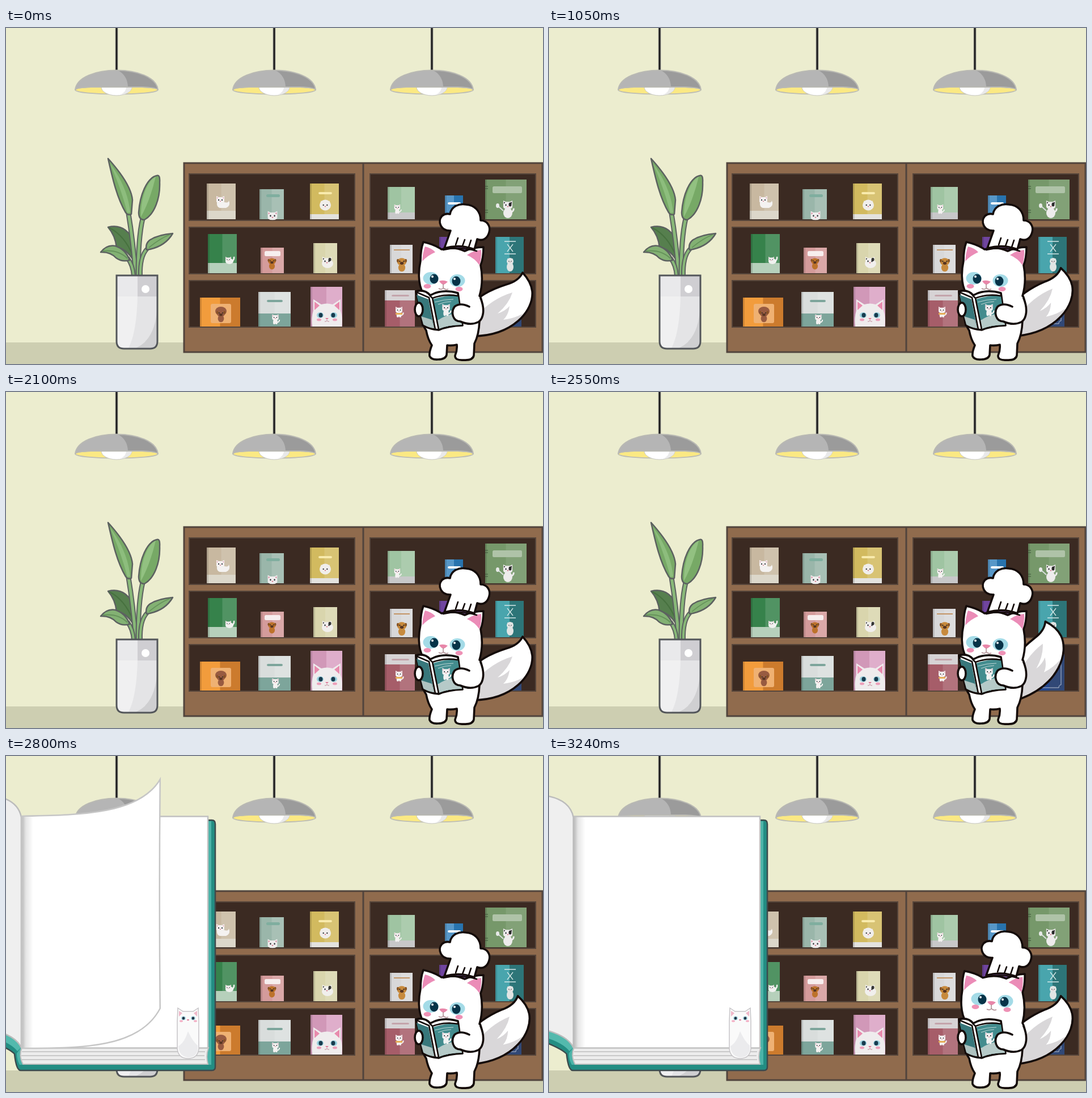
Recreate the animation shown at these times as an HTML page. Size 947 by 592 pixels, loop 3390 ms.

```html
<!DOCTYPE html>
<html lang="en">
<head>
<meta charset="utf-8">
<title>Reading cat</title>
<style>
html, body { margin: 0; width: 100%; height: 100%; overflow: hidden; background: #ecedcf; }
svg { display: block; width: 100%; height: 100%; }
.ink { stroke: #140b09; stroke-width: 3.6; stroke-linejoin: round; stroke-linecap: round; fill: #fff; }
.leaf { stroke: #5c6160; stroke-width: 2.5; stroke-linejoin: round; }
</style>
</head>
<body>
<svg id="stage" viewBox="0 0 947 592"></svg>
<script>
const rect = (x, y, w, h, fill, more = '') =>
  `<rect x="${x}" y="${y}" width="${w}" height="${h}" fill="${fill}" ${more}/>`;
const oval = (x, y, rx, ry, fill, more = '') =>
  `<ellipse cx="${x}" cy="${y}" rx="${rx}" ry="${ry}" fill="${fill}" ${more}/>`;
const path = (d, fill = 'none', more = '') => `<path d="${d}" fill="${fill}" ${more}/>`;
const ink = (d, more = '') => `<path class="ink" d="${d}" ${more}/>`;
const stroke = (color, width) => `stroke="${color}" stroke-width="${width}"`;
const group = (id, content) => `<g id="${id}">${content}</g>`;
const at = (x, y, content, scale = 1) => `<g transform="translate(${x} ${y}) scale(${scale})">${content}</g>`;

const lampRim = 'Q72 105 45 104H-45Q-72 105-73 109Z';
const lamp = x => at(x, 0,
  rect(-2, -3, 4, 78, '#1c1c1c', stroke('#a9a9a2', 1)) +
  path('M-73 109C-70 119 70 119 73 109' + lampRim, '#fbe983', stroke('#bdbdb4', 2)) +
  path('M-27 104A27 15 0 0 0 27 104Z', '#fff', stroke('#c8c8c4', 1)) +
  path('M17 104Q17 113 6 118A27 15 0 0 0 27 104Z', '#e9e9e9') +
  path('M-73 109C-68 63 68 63 73 109' + lampRim, '#b5b5b5') +
  path('M0 74C14 79 20 92 20 104H45Q72 105 73 109C68 86 34 74 0 74', '#9b9b9b') +
  path('M-73 109C-68 63 68 63 73 109' + lampRim, 'none', stroke('#b9b9b3', 2)));

function plant() {
  const stem = (d, w) => path(d, 'none', stroke('#5c6160', w + 4)) + path(d, 'none', stroke('#88b878', w));
  const leaf = (d, fill = '#77a966') => path(d, fill, 'class="leaf"');
  const vase = 'M195 436H267V552Q267 565 254 565H208Q195 565 195 552Z';
  return leaf('M180 351C204 345 222 360 225 382V410Q212 388 195 387Q193 366 180 351Z', '#567f4e') +
    path('M182 352Q209 365 224 402', 'none', stroke('#47713f', 2)) +
    stem('M216 327Q224 375 229 437', 5) + stem('M241 336Q233 370 233 437', 5) +
    stem('M214 405Q224 418 225 437', 4) + stem('M249 389Q236 402 237 437', 4) +
    leaf('M180 230C198 250 221 280 223 303L221 328Q215 331 211 325C196 300 188 266 180 230Z') +
    path('M183 238C201 262 216 292 219 325L214 326C205 290 193 261 183 238', '#8dbd7d') +
    leaf('M266 260Q272 258 271 272C272 300 262 328 244 338Q234 338 234 325C236 295 248 264 266 260Z') +
    path('M264 262C250 268 237 298 238 333Q254 304 264 262', '#92c181') +
    leaf('M167 395Q178 381 193 384Q211 390 218 409Q205 413 194 405Q184 394 167 395Z', '#83b173') +
    path('M171 393Q198 390 214 406', 'none', stroke('#65925a', 2)) +
    leaf('M294 362Q280 386 248 391Q245 381 253 374Q268 364 294 362Z', '#83b173') +
    path('M289 364Q271 371 252 387', 'none', stroke('#65925a', 1.5)) +
    path(vase, '#e4e4e6') +
    path('M196 437H232Q234 530 216 564H208Q196 564 196 552Z', '#f0f0f1') +
    rect(232, 437, 34, 36, '#cfced2') + rect(196, 437, 36, 36, '#e9e9eb') +
    path('M266 500Q261 550 229 564H254Q266 564 266 552Z', '#cfcfd1') +
    oval(246, 460, 7, 7, '#fff') +
    path(vase, 'none', stroke('#53565a', 3));
}

// Small pet, head centred on the origin, about 16 px wide.
const pet = (x, y, scale = 1, coat = '#f4f2f1', inner = '#e79ab2', body = true) => at(x, y,
  (body ? path('M-4 4Q-6 12-4 15H-1L0 13 1 15H4Q6 10 4 4Z', coat) + path('M4 11Q9 10 9 5', 'none', stroke(coat, 2.5)) : '') +
  path('M-7 1L-7-7-3-5H3L7-7V1Q8 6 0 6Q-8 6-7 1Z', coat) +
  path('M-6-5V-2L-4-4ZM6-5V-2L4-4Z', inner) +
  oval(-3, 0, 1, 1.2, '#292b32') + oval(3, 0, 1, 1.2, '#292b32') +
  oval(0, 2.2, 1.1, .8, '#d26b80'), scale);

const dog = (x, y, scale = 1, coat = '#c78a3d') => at(x, y,
  oval(0, 10, 6, 7, coat) + oval(0, 0, 8, 6.5, coat) +
  oval(-7, -2, 1.8, 3, '#875222') + oval(7, -2, 1.8, 3, '#875222') +
  oval(0, 2.5, 3.2, 2.4, '#573522') + oval(-3.5, -1, 1, 1.2, '#222') + oval(3.5, -1, 1, 1.2, '#222'), scale);

function book(x, y, w, h, color, { right = '#ffffff22', band, bandH = 0, bar, top = '' } = {}) {
  return rect(x, y, w, h, color) + rect(x + w / 2, y, w / 2, h, right) + top +
    (band ? rect(x, y + h - bandH, w, bandH, band) : '') +
    rect(x, y, 3, h, '#0002') +
    (bar ? rect(...bar, 'rx="2.5"') : '');
}

const bigFace = at(566, 502,
  path('M-26 24Q-28 8-24-4V-24L-10-15Q0-18 10-15L24-24V-4Q28 8 26 24Z', '#efeced') +
  path('M-22-20V-5L-13-13ZM22-20V-5L13-13Z', '#e88bad') +
  [-1, 1].map(s => oval(12 * s, 4, 6, 5, '#9bd2df') + oval(11 * s, 4, 3.5, 4, '#183b4e') +
    oval(14 * s, 12, 4, 2.3, '#eda0ba')).join('') +
  path('M-3 9H3L0 12Z', '#df7998') + path('M-4 15Q-1 16 0 13Q1 16 4 15', 'none', stroke('#bd8796', 1)));

function shelf() {
  const cells = [323, 642].flatMap(x => [257, 351, 445].map(y =>
    rect(x, y, 292, 82, '#3b2a22', stroke('#57463b', 2)))).join('');
  return rect(314, 238, 632, 333, '#906b4d', stroke('#51443d', 3)) +
    path('M630 238V571', 'none', stroke('#51443d', 3)) + cells +
    book(354, 274, 51, 63, '#c8b8a0', { band: '#dcd7ca', bandH: 15 }) + pet(378, 303, 1, '#f4f2f1', '#e79ab2', false) +
    path('M372 307H386Q392 309 393 304Q397 313 388 317H377Q371 315 372 307Z', '#f4f2f1') +
    book(447, 284, 43, 53, '#9ab6aa', { bar: [459, 293, 24, 5, '#7fae9f'] }) + pet(470, 331, 1.2, '#efeded', '#d87894', false) +
    book(536, 274, 51, 63, '#d2ba5f', { band: '#e3e2df', bandH: 9, bar: [551, 289, 24, 4, '#f8eaac'] }) +
    oval(563, 312, 10, 9.5, '#f0eeeb') + pet(563, 312, 1.1, '#f0eeeb', '#f0eeeb', false) +
    book(673, 280, 48, 57, '#9fc4a2', { band: '#c8c8c9', bandH: 12 }) + pet(690, 316, .75) +
    book(774, 295, 32, 42, '#5797c8', { right: '#2873ae', bar: [779, 307, 23, 4, '#fff'] }) +
    book(845, 267, 73, 70, '#76986a', { right: '#ffffff16', bar: [858, 279, 52, 12, '#afc3a8'] }) +
    path('M845 279H850M845 283H850M845 321H850M845 325H850', 'none', stroke('#3d5338', 1)) +
    oval(885, 326, 8, 9, '#eeecec') + pet(885, 312, 1.15, '#eeecec', '#292929') + oval(889, 311, 2.5, 3.5, '#292929') +
    path('M867 313L877 322', 'none', stroke('#d9dedd', 2)) + oval(867, 313, 3, 4, '#e6e9e7') +
    book(356, 363, 51, 69, '#36824b', { band: '#b6d0bb', bandH: 18 }) +
    oval(394, 411, 7, 5, '#f0f1ef') + pet(392, 408, .7, '#f0f1ef', '#e79ab2', false) +
    path('M398 412Q403 408 402 403', 'none', stroke('#f0f1ef', 2.5)) +
    book(449, 387, 41, 45, '#d49b9b', { bar: [456, 393, 28, 9, '#f7eeee'] }) + dog(469, 411, .85, '#bd722b') +
    book(542, 379, 42, 53, '#d9d5ad') + oval(567, 415, 10, 8, '#f1efed') +
    pet(566, 411, 1.15, '#f1efed', '#333', false) + oval(571, 408, 2.5, 3, '#333') +
    book(677, 382, 40, 50, '#d8d8d9') + rect(684, 390, 28, 2, '#c39465') + dog(698, 412, 1.02) +
    book(764, 368, 48, 64, '#70459f') +
    book(863, 368, 50, 64, '#49a5ad', { right: '#2d7578' }) +
    path('M879 376H899M879 398H899M884 381L894 394M894 381L884 394', 'none', stroke('#d5e8e7', 1.3)) +
    oval(889, 411, 6, 6, '#e1e5e4') + oval(889, 421, 6, 8, '#e1e5e4') + pet(889, 411, .7, '#e1e5e4', '#e1e5e4', false) +
    book(342, 475, 71, 51, '#f29c3c', { right: '#cc7b2d' }) + rect(361, 486, 36, 34, '#efb173', 'rx="3"') +
    oval(379, 499, 10, 8, '#985b41') + dog(379, 503, .9, '#985b41') +
    book(445, 465, 57, 61, '#d9dddc', { band: '#7da59b', bandH: 23, bar: [460, 479, 28, 4, '#7da59b'] }) + pet(475, 510, .8) +
    book(537, 456, 56, 70, '#d198b8', { right: '#dfaecb' }) + bigFace +
    book(668, 462, 53, 64, '#a65d69', { top: rect(668, 462, 53, 18, '#d7d3d5'), bar: [680, 470, 31, 3, '#c4a4ab'] }) +
    pet(693, 497, .85) + rect(687, 502, 12, 3, '#e5ad58') +
    book(856, 462, 53, 64, '#25478d', { right: '#314876' }) +
    path('M862 472Q866 472 866 468H899Q899 472 903 472V516Q899 516 899 521H866Q866 516 862 516Z', 'none', stroke('#b5bed0', 1));
}

const tailOutline = 'M818 490Q838 466 882 452Q904 446 911 431Q926 447 928 464C931 498 894 542 824 543Z';
const tail = path(tailOutline, '#fff') +
  path('M820 518Q852 478 893 466Q887 486 867 503Q880 499 888 490Q886 506 877 514Q896 512 912 503C894 530 862 543 824 543Z', '#d9d7d9') +
  ink(tailOutline, 'style="fill:none"');

const face = [[749, 441, 755, 743, 455], [796, 445, 794, 799, 460]].map(([x, y, pupil, cheekX, cheekY]) =>
  oval(x, y, 13.5, 11, '#a4dbe7') + oval(pupil, y + 1, 7.5, 8.5, '#073348') +
  oval(pupil - 3, y - 3, 2, 2, '#fff') + oval(cheekX, cheekY, 6.5, 4, '#ee91b5')).join('') +
  path('M764 446Q771 443 779 447Q774 452 771 452Q767 451 764 446', '#e886a9') +
  path('M771 451V458M763 459Q769 462 771 458Q775 462 780 460', 'none', stroke('#a9868c', 1.5));

const head = ink('M736 468C725 450 728 424 731 410Q731 390 736 377Q755 381 768 390Q790 384 809 393Q825 386 842 386Q842 406 837 418C841 438 840 455 835 472') +
  path('M739 385Q751 388 757 395Q743 401 734 411Q735 395 739 385ZM838 391Q824 392 813 400Q827 406 835 418Q839 405 838 391', '#eb8cb7');

const hat = ink('M773 388L784 357C767 358 760 341 769 331Q775 326 783 328C785 314 799 309 811 311C827 312 837 323 837 339C849 339 855 350 852 360C849 371 841 376 831 372L826 390Q800 380 773 388Z') +
  ink('M797 370L793 382M809 373L805 384M820 374L816 386M771 391Q800 384 830 393', 'style="fill:none;stroke-width:2.6"');

const body = ink('M736 468C728 493 732 520 741 533Q744 549 751 559Q746 571 747 578Q750 585 762 584Q775 584 777 576L778 559Q787 560 795 558Q796 568 792 577Q791 586 807 585Q823 586 825 577L826 556Q834 541 835 516C842 501 840 480 835 470');

const smallBook =
  ink('M723 464Q739 460 748 471Q769 459 797 467L805 524Q780 525 763 532L755 531Q744 529 735 524Z') +
  path('M724 470L745 478 755 529Q744 527 736 522Z', '#38777b') +
  path('M732 508L751 514 755 529Q744 527 736 522Z', '#afc2c0') +
  path('M753 478Q775 470 797 472L804 523Q780 523 763 530Z', '#438c8e') +
  path('M760 516Q780 502 801 503L804 523Q780 523 763 530Z', '#b6cac8') +
  ink('M723 465L746 475 757 531M748 472L752 476 763 531M752 476Q773 468 797 472', 'style="fill:none;stroke-width:2.6"') +
  path('M756 483Q772 478 789 478M762 487Q774 482 785 482', 'none', stroke('#bed6d5', 1)) +
  pet(776, 493, .95, '#f1f2f2');

const paws = oval(728, 496, 7, 12, '#fff', 'class="ink"') +
  ink('M837 476C845 496 842 512 833 518Q819 525 801 517C788 517 784 501 791 491Q801 483 817 491');

const bookmark = path('M318 467L319 444 328 450H346L355 444 356 467V516Q354 533 337 533Q320 533 318 516Z', '#fafafa', stroke('#c6c4c7', 1.5)) +
  path('M337 485Q345 503 354 510V518Q351 531 337 531Q321 529 320 511Q330 507 337 485', '#ebebed') +
  path('M321 449V459L327 453ZM353 449V459L347 453Z', '#efb6c8') +
  [329, 346].map(x => oval(x, 462, 4, 3.4, '#a9d8e4') + oval(x, 462, 2.3, 2.6, '#234')).join('') +
  oval(325, 467, 3, 1.8, '#f3afc5') + oval(350, 467, 3, 1.8, '#f3afc5') + oval(337, 465, 2, 1.3, '#e1809f');

const bigBook =
  path('M43 113H379Q385 113 385 120V548Q385 554 379 554H42Q34 554 31 525Q20 513-30 496V470H43Z', '#238d83', stroke('#3c4a4d', 2.5)) +
  path('M370 115H378V544H40Q35 535 35 524L42 514H370Z', '#4bb3a8') +
  path('M-30 475Q30 481 42 514L36 520Q20 500-30 490Z', '#53b9ad') +
  path('M44 514H373Q368 528 372 543H46Q38 528 44 514Z', '#ededed', stroke('#bfbfbf', 2)) +
  path('M44 521H367M43 528H366M43 535H367', 'none', stroke('#c9c9c9', 1.8)) +
  rect(44, 106.5, 328, 408, 'url(#gutter)', stroke('#c1c1c1', 2.5)) +
  path('M-40 68Q35 66 43 108V514Q31 486-40 476Z', '#efefef', stroke('#bcbcbc', 2.5)) +
  path('', 'url(#gutter)', 'id="page" ' + stroke('#c6c6c6', 2.5)) + bookmark;

const stage = document.getElementById('stage');
stage.innerHTML =
  `<defs><linearGradient id="gutter" gradientUnits="userSpaceOnUse" x1="44" x2="64" y1="0" y2="0">
    <stop stop-color="#b9b9b9"/><stop offset=".35" stop-color="#e5e5e5"/><stop offset="1" stop-color="#fff"/>
  </linearGradient></defs>` +
  rect(0, 0, 947, 592, '#ecedcf') + rect(0, 554, 947, 38, '#cdceb1') +
  [195, 473, 751].map(lamp).join('') + plant() + shelf() +
  group('tail', tail) + body + group('head', head) + group('face', face) + group('hat', hat) +
  smallBook + paws + group('bigBook', bigBook);

const el = id => document.getElementById(id);
const move = (id, transform) => el(id).setAttribute('transform', transform);

const LOOP = 3390, BOOK_IN = 2700, LOOK_UP = 3240;
const swing = [-14, -9.4, -4.8, 0, 5.4, 13, 20.6, 24];
const lateSwing = [5, 4, 3, 2, 2, 3, 4];
const pageAngles = [0, 42, 75, 120, 155];

// The tail bounces between the ends of its swing, one pose every 150 ms.
function tailPose(time, step) {
  if (time >= BOOK_IN) return lateSwing[step];
  const phase = (Math.floor(time / 150) + 3) % 14;
  return phase <= 7 ? phase : 14 - phase;
}

function turnedPage(degrees) {
  const angle = degrees * Math.PI / 180;
  const reach = 328 * Math.cos(angle), lift = Math.sin(angle);
  const edge = 44 + reach, top = 106 - 97 * lift, bottom = 515 - 105 * lift;
  return `M44 106C${44 + reach * .42} 104 ${44 + reach * .85} ${106 - 4 * lift} ${edge} ${top}` +
    `Q${edge - 3 * lift} 245 ${edge} ${bottom}` +
    `C${44 + reach * .85} 514 ${44 + reach * .45} 515 44 515Z`;
}

function draw(now) {
  const time = now % LOOP;
  const lookingUp = time >= LOOK_UP;
  const reading = time < BOOK_IN;
  const step = lookingUp ? 6 : Math.min(5, Math.floor((time - BOOK_IN) / 100));

  // Poses run forward on the swing scale when the tail rises.
  move('tail', `rotate(${-swing[tailPose(time, step)]} 820 516)`);
  move('head', lookingUp ? 'rotate(-2 785 470)' : '');
  move('face', lookingUp ? 'translate(9 -13)' : '');
  move('hat', lookingUp ? 'translate(-2 -1.5)' : '');

  el('bigBook').style.display = reading ? 'none' : '';
  if (!reading) {
    move('bigBook', `translate(${-16 * Math.max(0, 2 - step)} 0)`);
    const turning = step < pageAngles.length;
    el('page').style.display = turning ? '' : 'none';
    if (turning) el('page').setAttribute('d', turnedPage(pageAngles[step]));
  }
  requestAnimationFrame(draw);
}
draw(performance.now());
</script>
</body>
</html>
```
